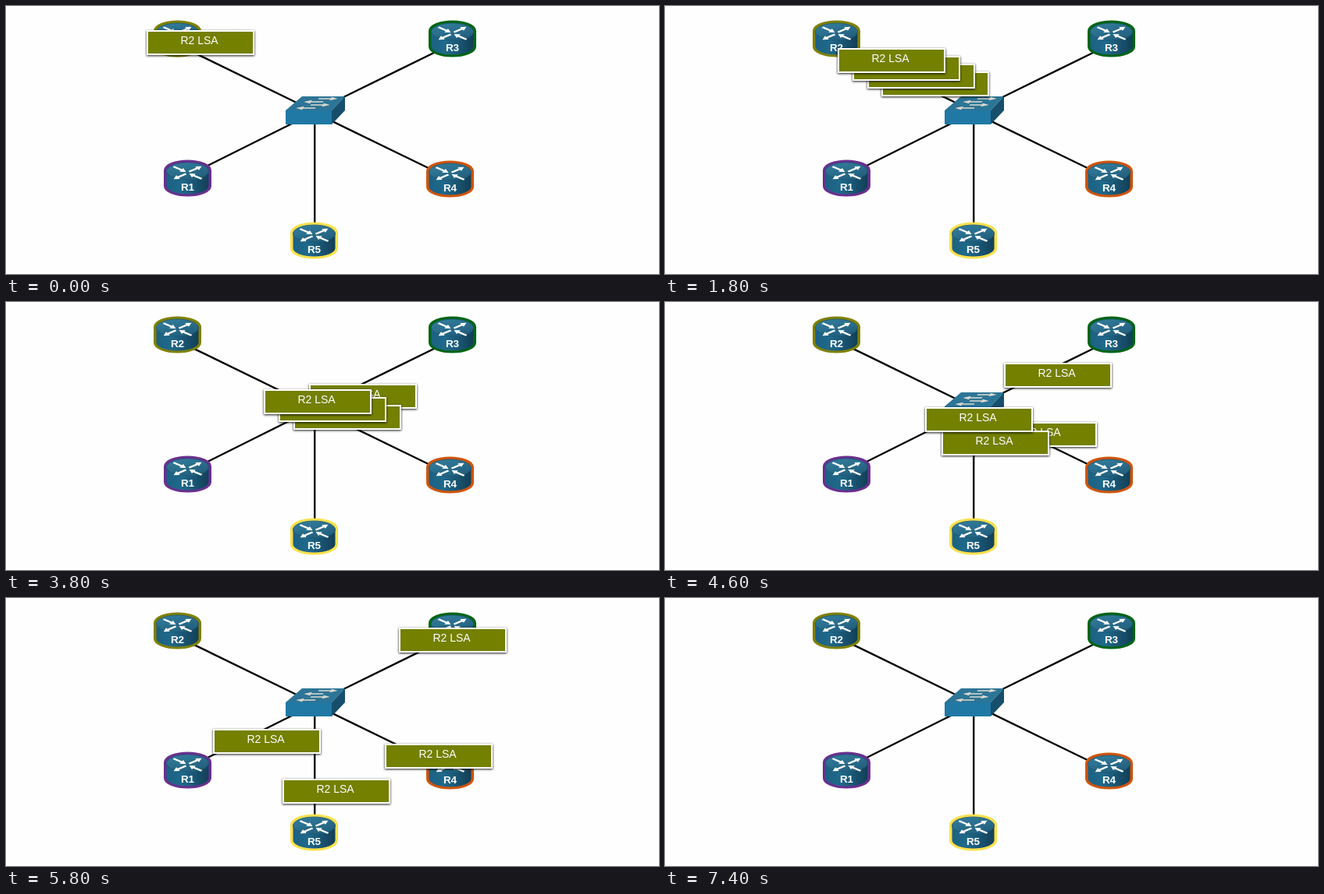
Write an HTML page that moves like this. It is 836x344 px and loops after 8 s.

```html
<!DOCTYPE html>
<html lang="en">
<head>
<meta charset="utf-8">
<title>LSA flooding</title>
<style>
  html, body { margin: 0; width: 836px; height: 344px; overflow: hidden; background: #fefefe; }
  svg { display: block; }
  text { fill: #fff; text-anchor: middle; font-family: "Liberation Sans", Arial, sans-serif; }
  .name { font-size: 13.5px; font-weight: bold; }
  .card { font-size: 14px; filter: drop-shadow(0 1px 1.5px rgba(0, 0, 0, .9)); }
</style>
</head>
<body>
<svg width="836" height="344" viewBox="0 0 836 344">
  <defs>
    <linearGradient id="side">
      <stop offset="0" stop-color="#1b6182"/>
      <stop offset=".35" stop-color="#20698b"/>
      <stop offset="1" stop-color="#123f57"/>
    </linearGradient>
    <linearGradient id="lid" x2=".6" y2="1">
      <stop offset="0" stop-color="#34809f"/>
      <stop offset="1" stop-color="#225f7d"/>
    </linearGradient>
    <path id="arrow" d="M0-1.6H12V-4.4L19 0 12 4.4V1.6H0Z"/>
    <g id="router">
      <path d="M-28.5-10A28.5 11.5 0 0 1 28.5-10V10A28.5 11.5 0 0 1-28.5 10Z" stroke-width="4"/>
      <path d="M-27-10V10A27 10.5 0 0 0 27 10V-10Z" fill="url(#side)" stroke="none"/>
      <ellipse cy="-9" rx="27" ry="11" fill="url(#lid)" stroke="#1d5874" stroke-width=".8"/>
      <g fill="#fff" stroke="none" transform="translate(0 -7) scale(1 .66)">
        <use href="#arrow" transform="translate(-18 -12) rotate(33)"/>
        <use href="#arrow" transform="translate(2 -2) rotate(-33)"/>
        <use href="#arrow" transform="translate(-2 2) rotate(147)"/>
        <use href="#arrow" transform="translate(18 12) rotate(213)"/>
      </g>
    </g>
  </defs>

  <path d="M240 59.6L378 127M552 58L430 118M252 208L368 150M545 210L416 147.2M395.2 150V285" stroke="#000" stroke-width="2.4"/>

  <g id="switch">
    <path d="M358 134L379 116H434L417 134Z" fill="#2c7596"/>
    <path d="M417 134L434 116V134L417 152Z" fill="#164f6b"/>
    <path d="M358 134H417V152H358Z" fill="#2079a4"/>
    <g fill="#ddd7cf">
      <use href="#arrow" transform="translate(400 119) skewX(-30) scale(1.3 .5)"/>
      <use href="#arrow" transform="translate(406 123) skewX(-30) scale(-1.3 .5)"/>
      <use href="#arrow" transform="translate(390 127) skewX(-30) scale(1.3 .5)"/>
      <use href="#arrow" transform="translate(396 131) skewX(-30) scale(-1.3 .5)"/>
    </g>
  </g>

  <g id="routers"></g>
  <g id="cards"></g>
</svg>
<script>
const LOOP = 8, STEP = 0.2;      // seconds
const GAP = 0.345, INBOUND = 3.2, OUTBOUND = 3.05;
const start = [179.6, 31.4], hub = [353.6, 124.8];

const routers = [
  ['R1', 232.5, 221, '#69308f'],
  ['R2', 219.5, 42, '#808000'],
  ['R3', 571.5, 42, '#006414'],
  ['R4', 568.5, 222, '#d0540c'],
  ['R5', 394.5, 301, '#fbe04c'],
];
// Outbound ends in order of departure: R3, R4, R5, R1
const ends = [[529, 23.5], [531, 208.5], [353.6, 296.5], [180, 209.5]];

document.getElementById('routers').innerHTML = routers.map(([name, x, y, color]) => `
  <g transform="translate(${x} ${y})">
    <use href="#router" fill="${color}" stroke="${color}"/>
    <text class="name" y="16">${name}</text>
  </g>`).join('');

const layer = document.getElementById('cards');
layer.innerHTML = ends.map(() => `
  <g class="card">
    <rect width="138" height="32" fill="#fff"/>
    <rect x="2" y="2" width="134" height="28" fill="#738000"/>
    <text x="67.5" y="18">R2 LSA</text>
  </g>`).join('');
const cards = [...layer.children];

const mix = (a, b, k) => a.map((v, i) => Math.round(v + (b[i] - v) * k));

function draw(time) {
  cards.forEach((card, i) => {
    const age = time - i * GAP;
    const shown = age >= 0 && age <= INBOUND + OUTBOUND;
    card.style.display = shown ? '' : 'none';
    if (!shown) return;
    const [x, y] = age < INBOUND
      ? mix(start, hub, age / INBOUND)
      : mix(hub, ends[i], (age - INBOUND) / OUTBOUND);
    card.setAttribute('transform', `translate(${x} ${y})`);
  });
}

function tick() {
  const time = performance.now() / 1000 % LOOP;
  draw(Math.floor(time / STEP + 1e-6) * STEP);
  requestAnimationFrame(tick);
}
tick();
</script>
</body>
</html>
```
